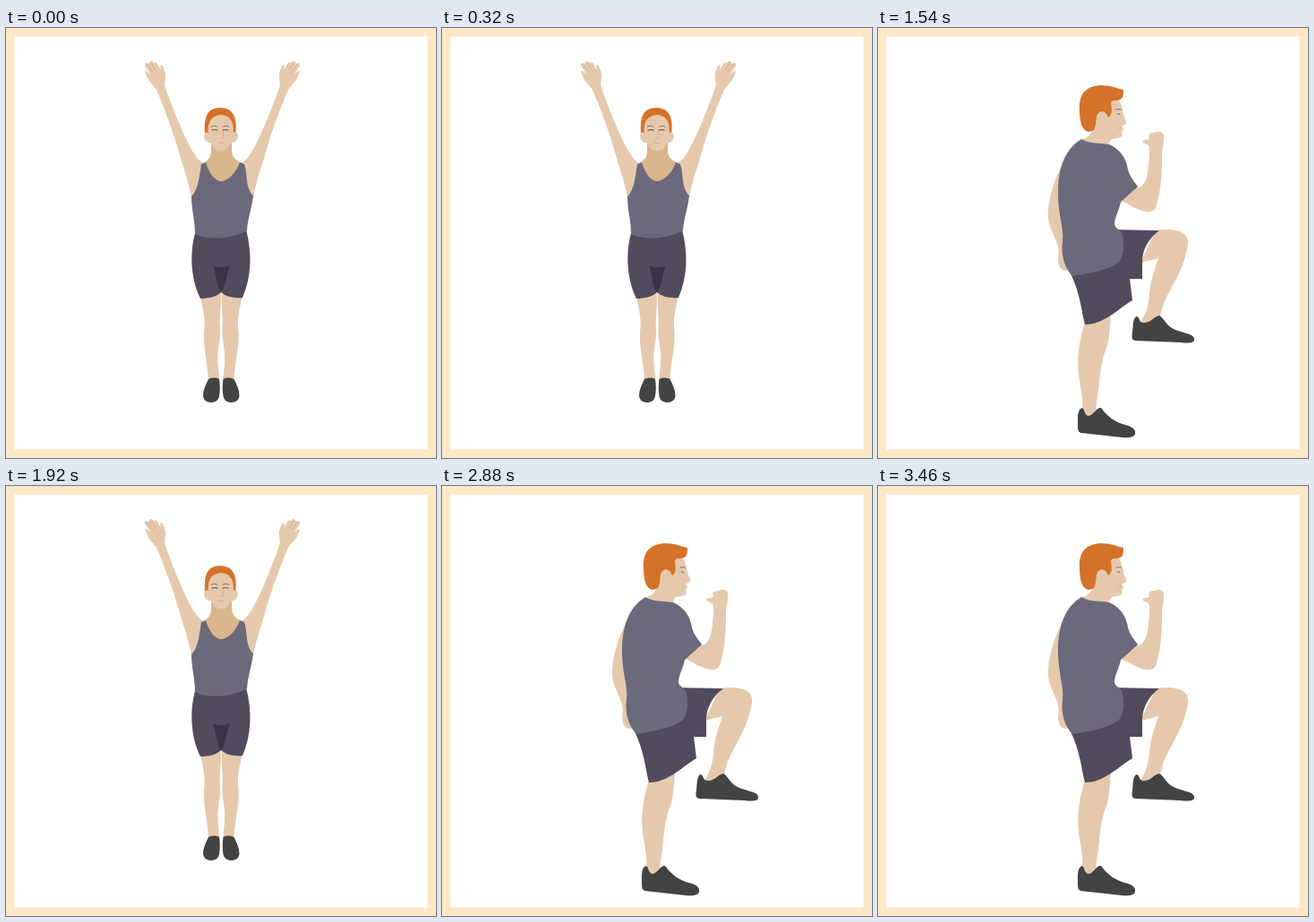
Write an HTML page that moves like this. It is 480 px wide and 480 px high and loops after 3840 ms.

```html
<!DOCTYPE html>
<html lang="en">
<head>
<meta charset="utf-8">
<title>Exercise</title>
<style>
  html, body { margin: 0; width: 100%; height: 100%; overflow: hidden; background: #fce8c4; }
  svg { display: block; width: 100%; height: 100%; }
  .skin { fill: #e6c9ad; }
  .neck { fill: #dab68c; }
  .hair { fill: #d4722a; }
  .top { fill: #6b6a7c; }
  .shorts { fill: #514b5d; }
  .fold { fill: #3a3346; }
  .shoe { fill: #434343; }
  .line { fill: none; stroke: #5b5047; stroke-linecap: round; }
  .soft { fill: none; stroke: #cfa88c; stroke-width: .8; stroke-linecap: round; }
  .pose { animation: swap 1920ms step-end infinite; }
  #knee { animation-delay: -960ms; }
  @keyframes swap { 0% { visibility: visible; } 50%, 100% { visibility: hidden; } }
</style>
</head>
<body>
<svg viewBox="0 0 480 480">
  <defs>
    <g id="arm" class="skin">
      <path d="M168 69C164 63 158 59 156 51C154 48 156 47 158 49L161 51L155 42C154 39 157 38 159 40L160 38C162 36 164 37 165 39C167 37 169 39 170 42L173 47C172 43 172 41 174 41C176 45 179 49 178 56C177 60 177 64 178 67C185 86 197 118 208 137C212 144 216 149 221 151L219 180L207 189C204 172 199 159 194 142C188 120 178 92 168 69Z"/>
      <path class="soft" d="M158 41L164 49M162 39L167 47"/>
    </g>
    <g id="leg">
      <path class="skin" d="M217 300C220 316 223 323 221 340C220 357 225 372 226 393L238 393C238 383 235 373 237 358C239 346 239.500 342 239 334C238 326 240 318 239.800 294Z"/>
      <path class="shoe" d="M226 392C229 390 236 390 238 392C239 398 239 405 238 411C237 416 233 418 229 418C224 418 220 415 220 410C220 404 223 398 226 392Z"/>
    </g>
  </defs>

  <rect x="9.500" y="9.500" width="461" height="461" fill="#fff"/>

  <g id="reach" class="pose">
    <use href="#arm"/>
    <use href="#arm" transform="matrix(-1 0 0 1 483 0)"/>
    <use href="#leg"/>
    <use href="#leg" transform="matrix(-1 0 0 1 480.500 0)"/>
    <path class="shorts" d="M211 229C205 251 206 280 217 302C226 302 235 300 240 295C246 300 254 302 264 301C274 278 275 252 268 225Z"/>
    <path class="fold" d="M231 265C237 268 244 268 250 265C246 273 247 285 240 295C234 286 235 273 231 265Z"/>
    <path class="neck" d="M229 128H252V138C253 146 259 149 264 151C258 165 250 173 240 173C230 172 223 163 220 151C225 148 229 145 229 137Z"/>
    <path class="top" d="M218 152L223 150C227 163 233 171 241 171C249 170 257 161 261 150L266 152C270 164 267 179 276 187C274 203 270 212 269 226C253 235 228 238 211 230C211 215 207 203 207 188C215 180 216 164 218 152Z"/>
    <path class="hair" d="M222 119C221 104 222 89 239 89C256 89 258 104 256 119Z"/>
    <path class="skin" d="M226 117C224 115 221 117 221 121C222 126 225 129 229 128C231 134 235 137 240 137C245 137 249 134 251 128C255 129 258 126 259 121C259 117 256 115 254 117C254 108 253 98 240 97C227 98 225 108 226 117Z"/>
    <path class="line" stroke-width=".7" stroke="#9a7657" d="M229 110Q232 108 236 110M242 110Q246 108 249 110"/>
    <path class="line" stroke-width="1.100" d="M230 114Q233 113 236 114M242 114Q245 113 248 114"/>
    <path class="soft" d="M242 116L243 122Q241 124 239 123M237 128Q240 129 243 128"/>
  </g>

  <g id="knee" class="pose">
    <path class="skin" d="M209 146C196 169 189 193 190 213C192 227 202 239 202 251C200 260 201 271 211 271L222 240Z"/>
    <path class="skin" d="M231 328C224 352 221 371 225 394C228 410 229 420 228 433H243C243 420 246 410 247 395C249 377 251 366 256 354C259 342 259 331 260 316Z"/>
    <path class="shoe" d="M228 424C231 426 230 432 235 433C241 432 244 423 249 424C256 434 265 440 276 443C284 445 288 448 287 453C286 457 279 458 272 457L227 452C223 451 223 448 223 443C223 435 222 426 228 424Z"/>
    <path class="skin" d="M310 226C330 223 348 226 346 242C343 262 334 278 326 293C319 305 316 315 314 328L293 329C304 311 302 301 304 289C306 276 310 267 313 257L293 262Z"/>
    <path class="shoe" d="M288 322C293 322 290 328 296 329C306 329 307 322 314 321C319 323 321 332 330 336C340 341 354 341 353 348C353 352 345 352 338 351L288 349C283 349 283 345 284 339C285 333 284 326 288 322Z"/>
    <path class="shorts" d="M260 225L314 226C302 235 295 247 295 262V280H281L284 304C266 315 252 331 231 331C227 316 226 297 215 274Z"/>
    <path class="skin" d="M286 177L291 178C299 175 301 165 302 153C303 143 304 137 302 131L296 128C295 126 296 125 299 125L303 124C301 119 303 117 308 117C312 115 318 115 319 120C320 126 317 134 317 143C317 164 316 179 311 198C309 206 302 206 295 204C287 202 280 196 271 193Z"/>
    <path class="skin" d="M238 112C240 119 234 122 226 125C236 133 248 134 258 131C258 126 260 123 267 123C272 122 274 120 272 116L274 113L272 110C274 108 278 108 277 104C273 98 274 88 268 79L251 82Z"/>
    <path class="hair" d="M235 116C227 114 225 104 225 91C224 73 233 64 250 64C259 64 266 67 274 69C274 74 274 78 270 80C266 82 261 79 260 84C261 91 262 96 257 100C255 94 250 91 246 95C242 99 245 106 241 114Z"/>
    <path class="line" stroke-width=".8" d="M266 91Q269 90 271 91M267 96Q269 94 270 97"/>
    <path class="soft" d="M268 112Q270 113 272 111"/>
    <path class="top" d="M227 124C238 130 248 128 258 130C270 135 277 145 279 158C281 166 286 171 290 177L271 194C269 204 264 211 264 219C265 225 271 224 273 231C275 244 274 254 269 261C258 270 236 274 217 277C208 268 204 253 206 238C208 224 200 205 201 180C202 151 211 134 227 124Z"/>
  </g>
</svg>
</body>
</html>
```
